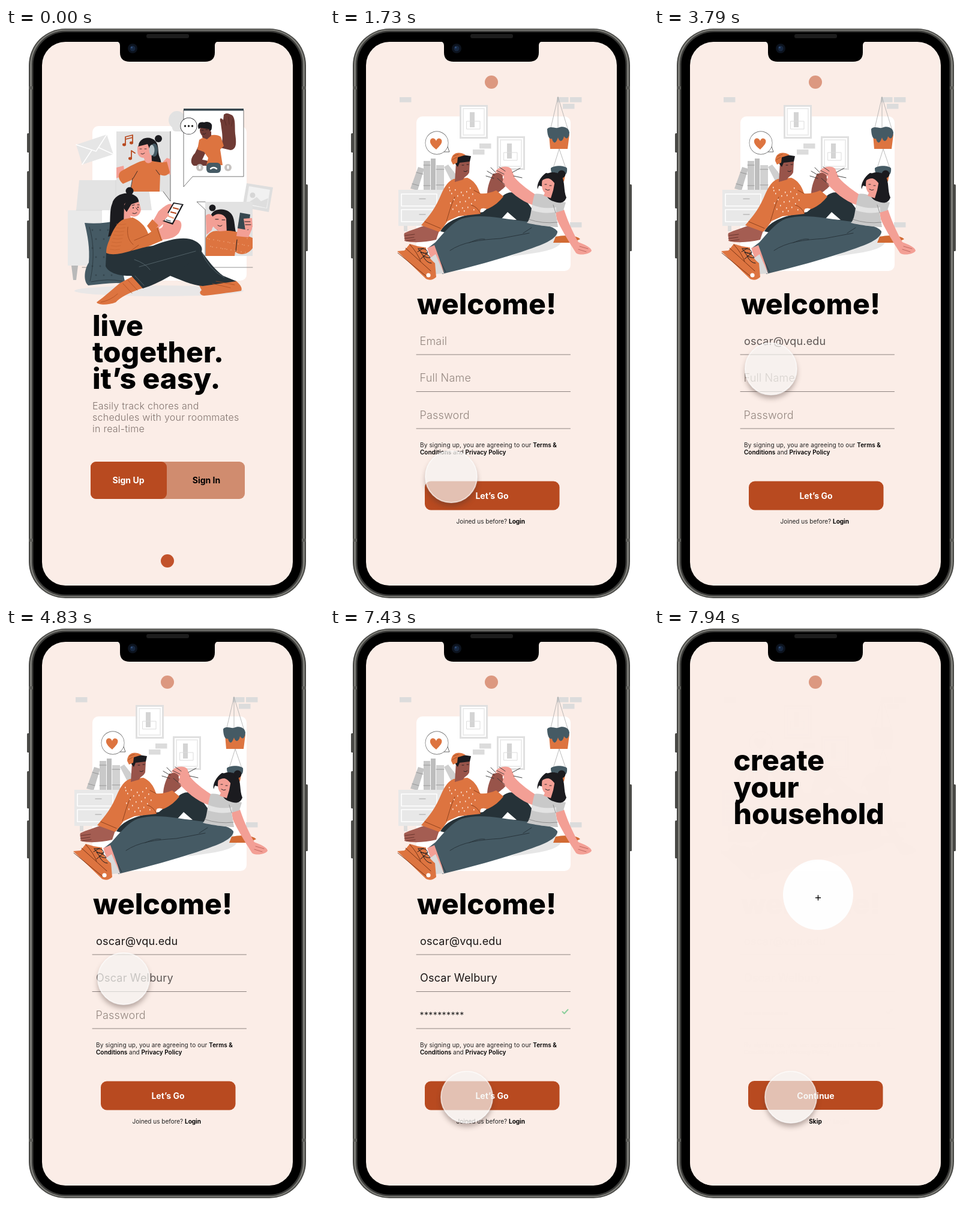
Recreate the animation shown at these times as an HTML page with a canvas. Size 530 by 951 pixels, loop 8000 ms.

```html
<!DOCTYPE html>
<html lang="en">
<head>
<meta charset="utf-8">
<title>Roommate app sign-up</title>
<style>
html, body { margin: 0; width: 100%; height: 100%; overflow: hidden; background: #fff; }
canvas { display: block; width: 530px; height: 951px; }
</style>
</head>
<body>
<canvas id="stage"></canvas>
<script>
const W = 530, H = 951, LOOP = 8000;
const BG = '#fbede7', RUST = '#b84a20', ORANGE = '#dd7440', SLATE = '#455a64',
  NIGHT = '#263238', PINK = '#f39f95', BROWN = '#6f3b35', TAN = '#98544a',
  INK = '#1b1b1f', GREY = '#e2e2e2', MID = '#c4c4c4';
const dpr = window.devicePixelRatio || 1;

function surface(canvas) {
  canvas.width = W * dpr;
  canvas.height = H * dpr;
  const c = canvas.getContext('2d');
  c.scale(dpr, dpr);
  return c;
}
const main = surface(document.getElementById('stage'));
const layer = surface(document.createElement('canvas'));
let g = main;

// Drawing helpers
function fill(color, d) {
  g.fillStyle = color;
  g.fill(new Path2D(d));
}
function line(color, width, d) {
  g.strokeStyle = color;
  g.lineWidth = width;
  g.lineCap = g.lineJoin = 'round';
  g.stroke(new Path2D(d));
}
function dot(color, x, y, rx, ry = rx) {
  g.fillStyle = color;
  g.beginPath();
  g.ellipse(x, y, rx, ry, 0, 0, 7);
  g.fill();
}
function box(color, x, y, w, h, r = 0) {
  g.fillStyle = color;
  g.beginPath();
  g.roundRect(x, y, w, h, r);
  g.fill();
}
function text(s, x, y, size, weight = 400, color = '#000', align = 'left', gap = 0) {
  g.font = `${weight} ${size}px Inter, "Open Sans", sans-serif`;
  g.textAlign = align;
  g.letterSpacing = gap + 'px';
  g.fillStyle = color;
  g.fillText(s, x, y);
  return x + g.measureText(s).width;
}
function faded(alpha, draw) {
  if (alpha <= 0) return;
  g.save();
  g.globalAlpha *= Math.min(1, alpha);
  draw();
  g.restore();
}
const ramp = (t, a, b) => Math.max(0, Math.min(1, (t - a) / (b - a)));
const smooth = u => u * u * (3 - 2 * u);

// Phone
function body() {
  for (const [y, h] of [[175, 32], [238, 62], [320, 63]]) box('#4b4b48', 35, y, 5, h, 1.5);
  box('#4b4b48', 498, 260, 5, 111, 1.5);
  box('#454542', 38, 1, 462, 947, 61);
  box('#7d7d78', 40, 2.5, 458, 944, 59);
  box('#3b3b39', 43, 4.5, 452, 940, 56);
  for (const y of [97, 849]) {
    box('#5c5c58', 38, y, 7, 5);
    box('#5c5c58', 493, y, 7, 5);
  }
  box('#000', 45.5, 7, 447, 935, 54);
  box(BG, 60, 23, 418, 904, 39);
}
function notch() {
  fill('#000', 'M184 22.5C189 23 190 26 190 30V41C190 51 196 56 206 56H332C342 56 348 51 348 41V30C348 26 349 23 354 22.5Z');
  box('#1d1d1d', 234, 10, 71, 7, 3);
  dot('#0c131e', 211, 34, 8);
  dot('#172740', 211, 34, 4.5);
  dot('#31507a', 209.5, 32.5, 1.4);
}
function badge(y, alpha) {
  faded(alpha, () => dot('#c2522b', 269, y, 11));
}

// Welcome picture: video chats around a seated woman
function videoWindow() {
  dot(GREY, 285, 153, 14, 15);
  box(GREY, 277, 147, 24, 25, 6);
  fill('#fff', 'M296 134H396V247H311L296 264Z');
  line('#555', .8, 'M296 137V264L311 247H396V137');
  box('#37474f', 296, 134, 100, 3.5);
  fill(BROWN, 'M357 199C364 186 359 170 358 158C355 150 358 148 362 153L363 144C368 140 372 143 377 145C383 151 381 164 382 176C384 190 385 202 374 203Z');
  line('#4e2621', .7, 'M364 152l3 10M371 148l1 12M378 152l-2 11');
  fill(BROWN, 'M325 187L315 208C307 216 307 226 313 229H346C348 224 340 221 327 219L336 200Z');
  fill(ORANGE, 'M322 186C335 178 350 175 358 181L363 196 357 202 361 228H334L337 216 330 206 319 202Z');
  fill(BROWN, 'M328 172H342V179L335 185 327 182Z');
  dot(BROWN, 332, 170, 9, 11);
  fill(INK, 'M321 168C318 160 322 155 330 157C337 154 345 158 343 165C343 170 340 174 338 168L324 166Z');
  line(INK, .8, 'M326 170h3M333 169h3M328 176q3 2 5 -1');
  for (const x of [323, 370]) {
    dot('#c7c3c0', x, 232, 6);
    box('#fff', x - 1.5, 228.5, 3, 6, 1.5);
  }
  box(SLATE, 334, 224, 24, 17, 6);
  line('#fff', 2.4, 'M341 234q5 -4 10 0');
  fill('#fff', 'M312 172L319 177 317 167Z');
  dot(INK, 304.5, 163, 14);
  dot('#fff', 304.5, 163, 13.3);
  for (const x of [298.5, 304.5, 310.5]) dot('#222', x, 163, 1.7);
}
function musicWindow() {
  fill(GREY, 'M184 172H274V288L262 272H184Z');
  line('#444', .8, 'M274 172V288L262 272');
  dot(INK, 254, 184, 6);
  fill(INK, 'M221 194C224 181 241 179 249 188C256 196 252 206 256 215C261 225 258 234 250 239L232 232 236 210Z');
  fill(PINK, 'M184 232L196 229 198 244 184 250ZM262 222L268 216 274 218V244L262 240Z');
  fill(ORANGE, 'M192 238C206 230 222 221 232 220C246 220 258 226 268 222L273 240C268 247 262 246 257 244L256 272H207L211 252 195 259C186 252 186 242 192 238Z');
  fill(PINK, 'M219 198C224 188 238 190 242 198L243 222C238 227 231 225 230 216C222 216 219 210 219 204Z');
  fill(INK, 'M220 197C226 185 244 184 248 196L240 203 236 193Z');
  dot(SLATE, 247, 203, 6, 11);
  dot('#b9c4c9', 243, 203, 4.5, 9);
  line(INK, .8, 'M223 201h3M231 201h3M225 209q3 2 6 -1M212 250L219 238M256 244L250 236M207 271L211 250');
  line(RUST, 1.8, 'M199 194V181L211 178V191M199 185L211 182M209 217V204L215 208');
  for (const [x, y] of [[197, 194], [209, 191], [207, 217]]) dot(RUST, x, y, 3, 2.4);
}
function photoWindow() {
  fill('#dedede', 'M401 258L445 265 438 306 394 298Z');
  fill('#f1f1f1', 'M405 263L440 269 435 300 400 294Z');
  dot('#d6d6d6', 411, 278, 4.5);
  fill('#dedede', 'M401 292L418 281 425 288 437 283 434 299Z');
  fill('#fff', 'M318 289H334V303Z');
  box(GREY, 332, 289, 79, 90);
  line('#555', .8, 'M332 379V302L318 289H332');
  dot(INK, 344, 299, 5.5);
  fill(INK, 'M341 314C343 300 362 299 371 305C382 312 380 326 383 339L360 342C346 332 340 324 341 314Z');
  fill(PINK, 'M343 315C350 306 363 308 367 317L368 342H353V336C347 334 344 328 343 322Z');
  fill(ORANGE, 'M333 349C340 337 350 336 356 338L369 337C384 337 394 342 411 349V366C402 378 390 378 382 372L381 379H333Z');
  fill(PINK, 'M333 312C338 306 344 311 346 316L355 321C351 328 344 328 343 336L334 344ZM384 346L387 329C386 320 393 315 399 317L410 316V334L404 348Z');
  fill('#37474f', 'M390 307L407 310 404 336 386 333Z');
  fill(PINK, 'M396 317L410 316 411 331 399 337Z');
  line(INK, 1, 'M349 318h5M360 319h5M353 328q4 3 7 0M398 322h9M399 327h9M385 352L383 371');
  for (let i = 0; i < 26; i++) dot('#f3b48f', 336 + i * 29 % 70, 350 + i * 17 % 24, .7);
}
function sitter() {
  fill(SLATE, 'M131 324C150 326 170 324 192 319C186 345 190 385 199 425C180 422 158 426 137 428C128 420 131 400 138 390C140 365 136 345 131 324Z');
  for (let i = 0; i < 18; i++) dot('#36474f', 144 + i % 3 * 13 + (i / 3 | 0) % 2 * 6, 336 + (i / 3 | 0) * 15, 1.4);
  line(NIGHT, .8, 'M139 331C148 360 146 395 140 421M142 422Q170 416 194 421');
  dot(INK, 206, 271, 6.5);
  fill(INK, 'M177 292C180 277 200 271 212 277C221 281 223 288 220 295L206 302C204 324 190 342 170 347C176 328 171 306 177 292Z');
  fill(PINK, 'M197 293C204 286 216 284 222 290L225 302C223 315 212 315 207 312L211 323 196 327Z');
  fill(INK, 'M196 299C198 284 216 280 221 289L209 293 201 306Z');
  line(INK, .9, 'M210 295l4 -1M219 294l3 0M211 308q4 2 7 -1M217 299l3 4');
  dot(INK, 212, 299, 1);
  dot(INK, 220, 298, 1);
  fill(PINK, 'M241 328L254 305C262 298 272 289 277 294C278 301 268 304 268 310L262 326 248 338Z');
  fill(ORANGE, 'M235 329L244 318 254 328 244 341Z');
  fill('#d9733d', 'M196 318C186 322 177 337 172 353C167 364 166 373 168 380C188 384 210 374 226 368L261 353C263 344 259 338 253 331L237 342C232 328 222 320 211 315Z');
  line('#9c441c', .8, 'M203 331C201 347 206 355 212 360M206 372L221 361M238 343L214 353M252 333L259 353');
  for (let y = 326; y < 370; y += 6) line('#c3622f', .6, `M${184 - (y - 326) * .25} ${y}q8 2 16 0`);
  fill(PINK, 'M254 334C264 333 262 325 261 319L283 319C294 318 295 330 288 341C280 350 270 351 260 352Z');
  fill(INK, 'M279 290L296 293 278 327 261 321Z');
  fill('#fff', 'M280 292L293 294 277 324 264 320Z');
  line(RUST, 2.2, 'M279 299L287 301M275 306L283 308');
  line('#ed9c78', 2.2, 'M271 313L279 316');
  line(SLATE, 1.4, 'M267 319L274 321');
  fill(PINK, 'M257 314L270 307 272 311 262 321Z');
  fill(ORANGE, 'M211 413L229 432C205 440 190 448 183 456C170 461 154 461 151 456C165 446 180 432 190 424Z');
  fill(ORANGE, 'M322 428C340 424 352 420 358 416L384 421C392 428 394 433 392 437C370 440 345 444 330 445C322 444 322 438 326 436Z');
  fill(NIGHT, 'M225 400C260 384 300 376 322 366C335 385 350 404 362 412L384 421 328 429C310 428 290 418 268 410Z');
  fill(NIGHT, 'M167 374C185 382 215 366 245 362C275 350 300 346 315 354C330 362 330 372 318 382C290 404 255 425 228 433L209 412C190 413 170 407 166 396Z');
  line('#64747b', .7, 'M214 385Q232 391 240 402M222 397L316 371M326 372Q336 400 364 415M215 412L230 428');
  line('#a84a1e', .7, 'M203 419L219 436M195 425L210 441M350 421L381 427M344 425L374 432M158 456Q174 453 186 442');
}
function startPage() {
  box('#fff', 144, 163, 257, 257, 10);
  dot('#e9e7e7', 255, 437, 141, 9);
  fill('#e3e3e3', 'M122 253H236L243 303H117Z');
  fill('#e9e9e9', 'M103 303H160V395H103Z');
  line('#d8d8d8', 1, 'M117 303H160M183 253V290');
  fill('#b9b9b9', 'M109 395H120L117 419H112Z');
  line('#666', .7, 'M127 398H140M325 398H411');
  fill('#e6e6e6', 'M117 194L168 177 179 210 127 227Z');
  line('#fff', 1.5, 'M117 194L150 205 168 177M127 227L143 203M179 210L155 199');
  videoWindow();
  musicWindow();
  photoWindow();
  sitter();
  ['live', 'together.', 'it’s easy.'].forEach((s, i) => text(s, 144, 512 + i * 44, 48, 800));
  ['Easily track chores and', 'schedules with your roommates', 'in real-time']
    .forEach((s, i) => text(s, 144, 633.5 + i * 19.3, 16, 300, '#82746f', 'left', .25));
  box('#d08c6f', 141, 721, 257, 62, 9);
  box(RUST, 141, 721, 127, 62, 9);
  text('Sign Up', 204, 757, 14, 700, '#fff', 'center');
  text('Sign In', 334, 757, 14, 700, '#000', 'center');
  badge(886, 1);
}

// Sign-up picture: two friends touching fists
function room() {
  box('#fff', 144, 147, 257, 257, 10);
  for (const [x, y] of [[116, 115], [378, 115], [400, 115], [388, 126], [249, 192], [238, 202], [400, 323]])
    box('#dcdcdc', x, y, 19.5, 8.5);
  for (const [x, y] of [[216, 128], [278, 180]]) {
    box('#e0e0e0', x, y, 47, 56);
    box('#fff', x + 3, y + 3, 41, 50);
    box('#ececec', x + 5, y + 5, 37, 46);
    box('#fff', x + 7, y + 7, 33, 42);
    box('#d4d4d4', x + 17, y + 12, 8, 25);
    line('#dcdcdc', 1, `M${x + 12} ${y + 27}h22v13h-22Z`);
  }
  line('#aaa', .8, 'M380 115L367 170M380 115L397 170M382 201L371 236M382 201L394 236M380 115V166');
  fill(ORANGE, 'M365 177H399L396 201H367ZM370 238H393L390 255H372Z');
  fill(SLATE, 'M362 168C366 162 374 167 380 166C388 162 398 165 399 174C398 184 394 186 390 180C388 190 382 190 380 182C376 194 372 192 370 184C364 186 362 176 362 168Z');
  fill(SLATE, 'M368 233C374 228 390 228 395 233C396 244 391 246 388 240C384 249 379 248 377 241C372 247 368 242 368 233Z');
  fill('#fff', 'M189 206L199 206 196 195Z');
  line('#444', .8, 'M190 206L199 206 196 197');
  dot('#555', 178, 191, 19.4);
  dot('#fff', 178, 191, 18.8);
  fill(ORANGE, 'M177 202C166 194 165 187 169 184C173 182 176 185 177 188C178 183 183 182 186 186C188 191 183 196 177 202Z');
  fill(MID, 'M147 231L157 234 146 270 134 267Z');
  fill('#cfcfcf', 'M190 231L197 227 212 246 207 264Z');
  box('#c9c9c9', 156, 221, 11, 48);
  box('#bdbdbd', 168, 217, 8, 52);
  box('#d2d2d2', 177, 228, 13, 41);
  line('#999', 1, 'M156 228h11M156 262h11M177 235h13M177 261h13M144 240l11 3M137 259l11 3');
  box('#e8e8e8', 114, 269, 76, 60);
  line('#fff', 1.5, 'M119 276H178V296H119ZM119 302H178V322H119Z');
  line('#bbb', 1.5, 'M149 284h10M149 310h10');
  box('#dcdcdc', 123, 329, 6, 9);
}
function man() {
  fill(NIGHT, 'M184 338C196 316 230 310 255 306L288 279C300 268 318 274 326 286L345 312 338 330 200 342Z');
  fill('#fff', 'M285 318L296 306 311 319Z');
  fill('#a45d52', 'M156 329C146 333 134 336 124 341C122 346 126 350 124 354C140 358 160 356 177 352L182 337Z');
  line('#5b2b25', .8, 'M125 345l16 -2M124 350l16 -2M127 354l15 -2');
  fill(TAN, 'M262 277C262 263 267 252 272 242L285 242 293 262C287 270 281 271 274 280Z');
  fill(ORANGE, 'M206 251C194 256 189 268 182 284C172 306 160 318 152 328L182 339C189 332 192 326 196 321L214 313 251 309C249 300 252 298 262 301C274 296 283 288 289 280L277 270C268 274 258 276 250 275C246 262 239 253 229 249Z');
  line('#7d3716', .8, 'M208 281C200 298 198 310 194 321M158 322L184 333M250 275L240 270M251 309Q247 298 235 294');
  for (let i = 0; i < 24; i++) box('#fbe0d0', 198 + i * 23 % 44, 264 + i * 13 % 42, 1.5, 2.5);
  fill(TAN, 'M210 224C216 216 230 218 233 222L232 240C229 247 224 246 222 252L208 256Z');
  fill(INK, 'M212 213L222 211 235 213 233 222 216 224 213 231 209 226Z');
  fill(ORANGE, 'M202 221C202 208 214 204 226 211L213 215 212 224 205 227Z');
  line('#8f421c', .7, 'M204 219l7 -4M206 213l8 -3');
  line(INK, .9, 'M220 228h3M228 227h3M223 238q4 2 6 -1');
}
function woman() {
  fill('#e6e6e6', 'M300 380C340 374 376 372 386 356L378 344Z');
  fill('#d26a33', 'M376 347C392 343 412 345 417 351L404 357 372 357Z');
  fill(PINK, 'M276 239C280 230 296 228 302 234L308 249C320 262 332 270 344 278L337 294C318 288 300 272 287 257L290 247Z');
  fill(TAN, 'M270 246C276 238 284 240 288 246L286 256 274 256Z');
  line('#333', .9, 'M260 246l13 4M262 238l12 7M268 232l8 8M304 240l13 -7M306 246l14 3M279 250l12 10M292 238l-10 -7M290 243l-12 -6');
  fill(SLATE, 'M163 366L176 356C190 340 205 322 220 317C250 308 280 316 330 322C350 326 372 328 379 338C380 346 366 356 345 363C300 380 240 396 187 409L184 394Z');
  line(NIGHT, .9, 'M200 370C220 356 250 352 284 350L332 341M232 357Q250 349 258 351M322 341l14 -9M172 364L193 406');
  fill(PINK, 'M376 306L390 302C398 326 408 346 414 356C424 360 434 364 436 370C434 376 416 379 410 374C396 352 384 332 378 318Z');
  line('#a8514a', .7, 'M416 363l14 4M414 368l13 4');
  fill('#c9c9c9', 'M341 276C352 274 362 279 372 286L393 290 389 303 376 307 380 331C366 331 340 327 328 324C336 316 334 300 341 276Z');
  fill('#e3e3e3', 'M337 294Q356 302 377 298V306Q356 310 336 303Z');
  line('#777', .7, 'M376 307L372 294M331 318Q354 326 379 323');
  fill(INK, 'M348 262C350 240 376 234 386 246C392 256 389 270 394 282C390 292 382 292 372 288C360 284 358 274 364 266Z');
  fill(PINK, 'M354 252C360 245 370 247 375 254L372 270 368 283 356 279 358 274C353 270 352 260 354 252Z');
  fill(INK, 'M346 268C350 256 354 250 364 250C372 252 374 260 379 262L378 244 360 241C350 248 344 260 346 268Z');
  dot(INK, 386, 243, 6.5);
  line(INK, .9, 'M358 260h3M366 262h3M359 268q4 3 7 1');
}
function shoes() {
  fill(PINK, 'M162 366L174 361 186 394 190 408 176 406Z');
  fill('#dadada', 'M166 383L176 376 190 408 176 409Z');
  fill(ORANGE, 'M112 371L124 370 133 359 147 363 160 365C160 374 166 384 175 391L177 414C172 419 166 420 160 417Z');
  line('#6b2c10', .9, 'M113 374L162 414M133 360Q146 374 151 388M126 366L168 404');
  line(INK, 1, 'M147 367q14 -2 16 6q-9 5 -16 -6M151 373q14 2 16 9q-10 1 -16 -9M155 379q6 12 14 12M146 372l10 -6M151 384l12 -10');
  dot('#fff', 164, 411, 3.6);
}
function formPage(t) {
  badge(90, .55);
  room();
  man();
  woman();
  shoes();
  text('welcome!', 145, 476, 48, 800);
  for (const y of [543, 604.5, 666]) line('#8d8380', 1, `M144 ${y}H400.5`);
  field('Email', 'oscar@vqu.edu', 527, ramp(t, 3400, 3960));
  field('Full Name', 'Oscar Welbury', 588, ramp(t, 4480, 4980));
  const typed = ramp(t, 5900, 6450);
  field('Password', '', 650, typed);
  faded(typed, () => text('*'.repeat(10), 149.5, 649, 14, 400, '#222', 'left', .4));
  faded(ramp(t, 7320, 7420), () => line('#8ccf9c', 2, 'M387.5 638L390.5 641 396.5 634.5'));
  let x = text('By signing up, you are agreeing to our ', 150, 697, 10, 400, '#222', 'left', .15);
  text('Terms &', x, 697, 10, 600);
  x = text('Conditions', 150, 708.5, 10, 600);
  x = text(' and ', x, 708.5, 10, 400, '#222');
  text('Privacy Policy', x, 708.5, 10, 600);
  box(RUST, 158, 753.5, 224.5, 48, 10);
  text('Let’s Go', 270, 782.5, 14, 700, '#fff', 'center');
  x = text('Joined us before? ', 210.5, 824, 10, 400, '#222');
  text('Login', x, 824, 10, 700);
}
function field(hint, value, y, done) {
  faded(1 - 2 * done, () => text(hint, 149.5, y, 18, 300, '#93867f', 'left', .2));
  faded(done, () => text(value, 150, y, 18, 400, '#1a1615', 'left', .2));
}

function createPage() {
  box(BG, 60, 23, 418, 904, 39);
  badge(90, .55);
  ['create', 'your', 'household'].forEach((s, i) => text(s, 132.5, 237 + i * 44.5, 48, 800));
  dot('#fff', 273.5, 443.5, 58.5);
  line('#000', 1.3, 'M269.5 448.5h8M273.5 444.5v8');
  box(RUST, 157, 753, 224.5, 48, 10);
  text('Continue', 269.5, 782.5, 14, 700, '#fff', 'center');
  text('Skip', 269, 824, 10, 700, '#000', 'center');
}

// Touch marker: time, x, y, ease-out power of the way there
const KEYS = [
  [100, 394, 690, 1], [810, 202, 746, 2], [2060, 202, 746, 1], [2120, 202, 743, 1],
  [2230, 202, 743, 1], [2850, 192, 525, 3], [3380, 192, 525, 1], [3950, 196, 583, 1],
  [4930, 196, 583, 1], [5130, 197, 620, 2], [5450, 197, 620, 1], [5690, 198, 641, 2],
  [6620, 198, 641, 1], [6690, 229, 733, 1], [7180, 228, 780, 2]
];
function markerAt(t) {
  const i = KEYS.findIndex(k => k[0] > t);
  if (i < 0) return KEYS[KEYS.length - 1].slice(1, 3);
  const [t0, x0, y0] = KEYS[Math.max(0, i - 1)], [t1, x1, y1, power] = KEYS[i];
  const p = 1 - (1 - ramp(t, t0, t1)) ** power;
  return [x0 + (x1 - x0) * p, y0 + (y1 - y0) * p];
}
function marker(t) {
  if (t < 100) return;
  const [x, y] = markerAt(t);
  faded(.3 + ramp(t, 100, 330), () => {
    const disc = new Path2D(), outside = new Path2D();
    disc.arc(x, y, 43, 0, 7);
    outside.rect(0, 0, W, H);
    outside.arc(x, y, 43, 0, 2 * Math.PI);
    g.save();
    g.clip(outside, 'evenodd');
    g.shadowColor = 'rgba(70,50,45,.38)';
    g.shadowBlur = 8 * dpr;
    g.shadowOffsetY = 6 * dpr;
    g.fillStyle = '#fff';
    g.fill(disc);
    g.restore();
    g.fillStyle = 'rgba(246,244,241,.7)';
    g.fill(disc);
    g.strokeStyle = 'rgba(255,255,255,.6)';
    g.lineWidth = 2;
    g.stroke(disc);
  });
}

function frame(now) {
  const t = now % LOOP;
  g = main;
  g.fillStyle = '#fff';
  g.fillRect(0, 0, W, H);
  body();
  if (t < 1730) startPage();
  else formPage(t);
  const mix = smooth(ramp(t, 7430, 7960));
  if (mix > 0) {
    g = layer;
    g.clearRect(0, 0, W, H);
    createPage();
    g = main;
    faded(mix, () => g.drawImage(layer.canvas, 0, 0, W, H));
  }
  notch();
  marker(t);
}
const start = performance.now();
function tick() {
  frame(performance.now() - start);
  requestAnimationFrame(tick);
}
tick();
</script>
</body>
</html>
```
